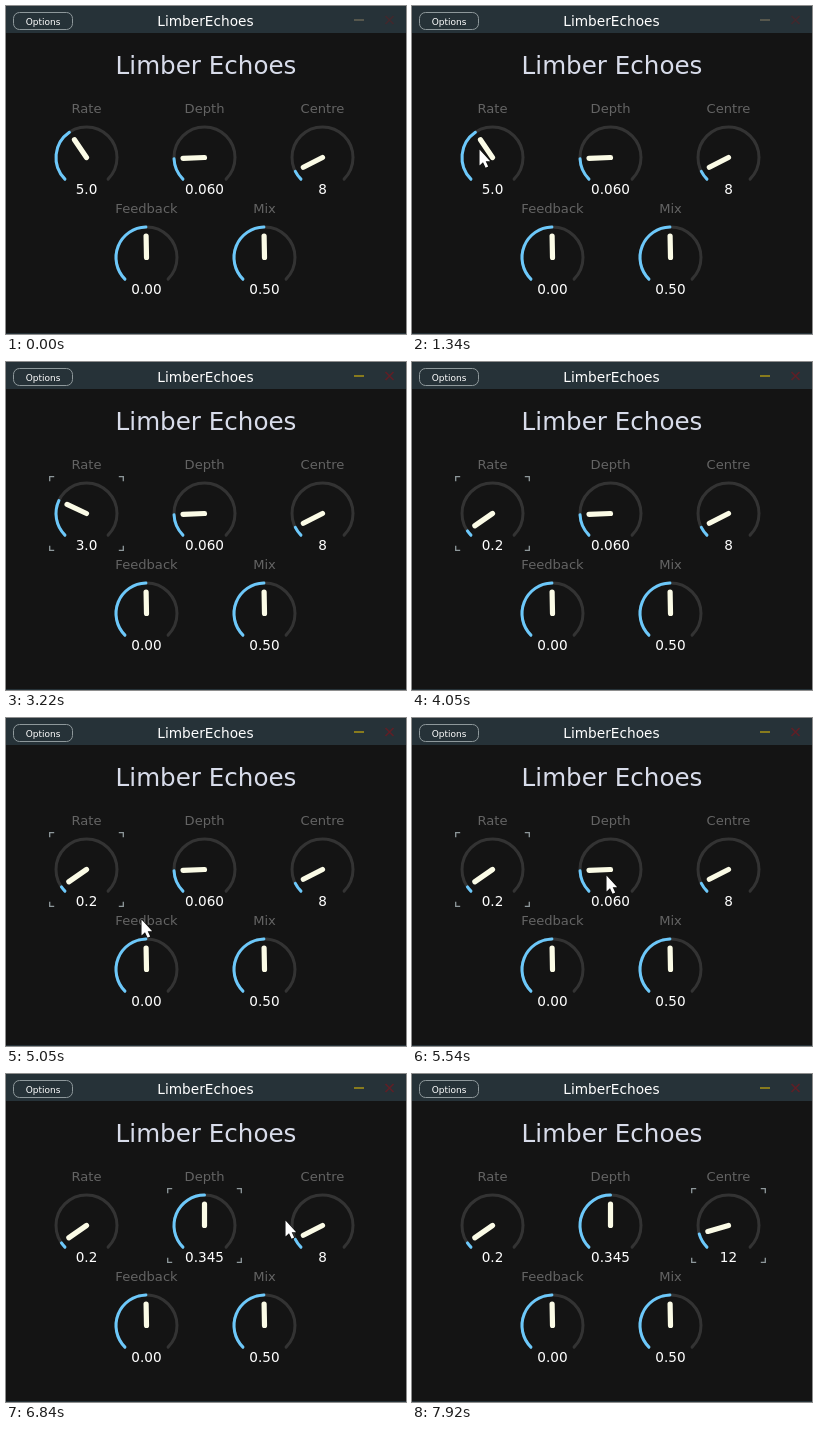
These frames come from a looping animation (400 by 328 pixels, 7990 ms). An HTML page:

```html
<!DOCTYPE html>
<html lang="en">
<head>
<meta charset="utf-8">
<title>LimberEchoes</title>
<style>
  html, body { margin: 0; width: 100%; height: 100%; overflow: hidden; background: #141414; }
  svg { display: block; width: 400px; height: 328px; }
  text { font-family: "DejaVu Sans", sans-serif; text-anchor: middle; fill: #fff; }
  .title { font-size: 24.6px; fill: #d8dcea; }
  .bar { font-size: 13.7px; }
  .button { font-size: 9px; }
  .label { font-size: 13.1px; fill: #646464; }
  .value { font-size: 13.6px; }
  .arc { fill: none; stroke-width: 3; stroke-linecap: round; }
  .track { stroke: #333; }
  .fill { stroke: #6cc8fa; }
  .hand { stroke: #fbfbe6; stroke-width: 5.2; stroke-linecap: round; }
  .focus { fill: none; stroke: #8e989b; stroke-width: 1.3; }
  .min { stroke: #5c5c50; stroke-width: 1.8; }
  .close { stroke: #42282d; stroke-width: 1.6; }
  .active .min { stroke: #94841a; }
  .active .close { stroke: #5f1f26; }
  #cursor { fill: #fff; stroke: #000; paint-order: stroke; }
</style>
</head>
<body>
<svg id="stage" viewBox="0 0 400 328">
  <rect width="400" height="328" fill="#141414"/>
  <rect width="400" height="27" fill="#263238"/>
  <rect y="327" width="400" height="1" fill="#263238"/>
  <rect x="7.5" y="6.5" width="59" height="17" rx="6" fill="#263238" stroke="#8e989b"/>
  <text class="button" x="37" y="19">Options</text>
  <text class="bar" x="199.5" y="20">LimberEchoes</text>
  <path class="min" d="M348 14H358"/>
  <path class="close" d="M379.5 10L387.5 18M387.5 10L379.5 18"/>
  <text class="title" x="200" y="68">Limber Echoes</text>
  <g id="knobs"></g>
  <path id="focus" class="focus"/>
  <path id="cursor" d="M.5 .5V16.5L4 13.2L6.6 18.8L9.2 17.6L6.7 12.2H11.2Z"/>
</svg>
<script>
const LOOP = 7990, STEP = 69, R = 30.5, HAND = 21.5;
const $ = id => document.getElementById(id);

function add(parent, tag, cls, attrs = {}, text = '') {
  const el = document.createElementNS('http://www.w3.org/2000/svg', tag);
  el.setAttribute('class', cls);
  for (const k in attrs) el.setAttribute(k, attrs[k]);
  el.textContent = text;
  return parent.appendChild(el);
}

// Point on a dial: p runs 0..1 over 270 degrees, clockwise from lower left.
function at(x, y, r, p) {
  const a = (p * 270 - 135) * Math.PI / 180;
  return [x + r * Math.sin(a), y - r * Math.cos(a)];
}

function arc(x, y, p) {
  return `M${at(x, y, R, 0)}A${R} ${R} 0 ${p * 270 > 180 ? 1 : 0} 1 ${at(x, y, R, p)}`;
}

function knob(label, x, y, digits, toPart) {
  const g = $('knobs');
  add(g, 'text', 'label', { x, y: y - 44.5 }, label);
  add(g, 'path', 'arc track', { d: arc(x, y, 1) });
  const fill = add(g, 'path', 'arc fill');
  const hand = add(g, 'path', 'hand');
  const value = add(g, 'text', 'value', { x, y: y + 36.5 });
  const set = v => {
    const p = toPart(v);
    fill.setAttribute('d', arc(x, y, p));
    hand.setAttribute('d', `M${x} ${y}L${at(x, y, HAND, p)}`);
    value.textContent = v.toFixed(digits);
  };
  return { x, y, set };
}

const rate = knob('Rate', 80.5, 151.5, 1, v => (v / 20) ** 0.71);
const depth = knob('Depth', 198.5, 151.5, 3, v => 0.5 * (v / 0.345) ** 0.66);
const centre = knob('Centre', 316.5, 151.5, 0, v => (v - 1.4) / 99);
knob('Feedback', 140.5, 251.5, 2, v => (v + 0.992) / 2).set(0);
knob('Mix', 258.5, 251.5, 2, v => v - 0.004).set(0.5);

// Easing: drags gather speed, the pointer glides to rest.
const drag = u => u ** 1.3;
const glide = power => u => 1 - (1 - u) ** power;
const move = (start, to, steps = 1, ease = drag, sag = 0) => ({ start, to, steps, ease, sag });

// Value at time t; each move sets out from where the last one ended.
function play(t, value, moves) {
  for (const { start, to, steps, ease, sag } of moves) {
    if (t < start) break;
    const k = Math.min(steps, Math.floor((t - start) / STEP) + 1);
    const e = ease(k / steps);
    value = value.map((v, i) => v + (to[i] - v) * e + i * sag * 4 * e * (1 - e));
  }
  return value;
}

const rateMoves = [move(2210, [0.2], 7), move(3150, [9.4], 5), move(3910, [0.2], 3)];
const depthMoves = [move(5809, [0.345], 5)];
const centreMoves = [move(7920, [12])];
const cursorMoves = [
  move(1130, [66, 135.4], 8, glide(4.6)),
  move(4640, [73, 185]),
  move(4910, [194, 157], 10, glide(2), 30),
  move(6500, [193, 118]),
  move(6700, [305, 154], 11, glide(4.6))
];

// The pointer shows up, then hides when it grabs a knob.
const visits = [
  { show: 870, grab: 1880, target: rate },
  { show: 4640, grab: 5740, target: depth },
  { show: 6500, grab: 7790, target: centre }
];

// Corner marks of a square around a knob.
function corners({ x, y }) {
  const h = 36.8, n = 4.5;
  return [[-1, -1], [1, -1], [1, 1], [-1, 1]].map(([i, j]) =>
    `M${x + i * (h - n)} ${y + j * h}h${i * n}v${-j * n}`).join('');
}

function draw(t) {
  rate.set(play(t, [5], rateMoves)[0]);
  depth.set(play(t, [0.06], depthMoves)[0]);
  centre.set(play(t, [8], centreMoves)[0]);

  const focus = visits.filter(v => v.grab <= t).pop();
  $('focus').setAttribute('d', focus ? corners(focus.target) : '');
  $('stage').classList.toggle('active', !!focus);

  const shown = visits.some(v => v.show <= t && t < v.grab);
  const pos = play(t, [94, 320], cursorMoves).map(Math.round);
  $('cursor').setAttribute('visibility', shown ? 'visible' : 'hidden');
  $('cursor').setAttribute('transform', `translate(${pos})`);
}

const begin = performance.now();
function tick() {
  draw((performance.now() - begin) % LOOP);
  requestAnimationFrame(tick);
}
tick();
</script>
</body>
</html>
```
